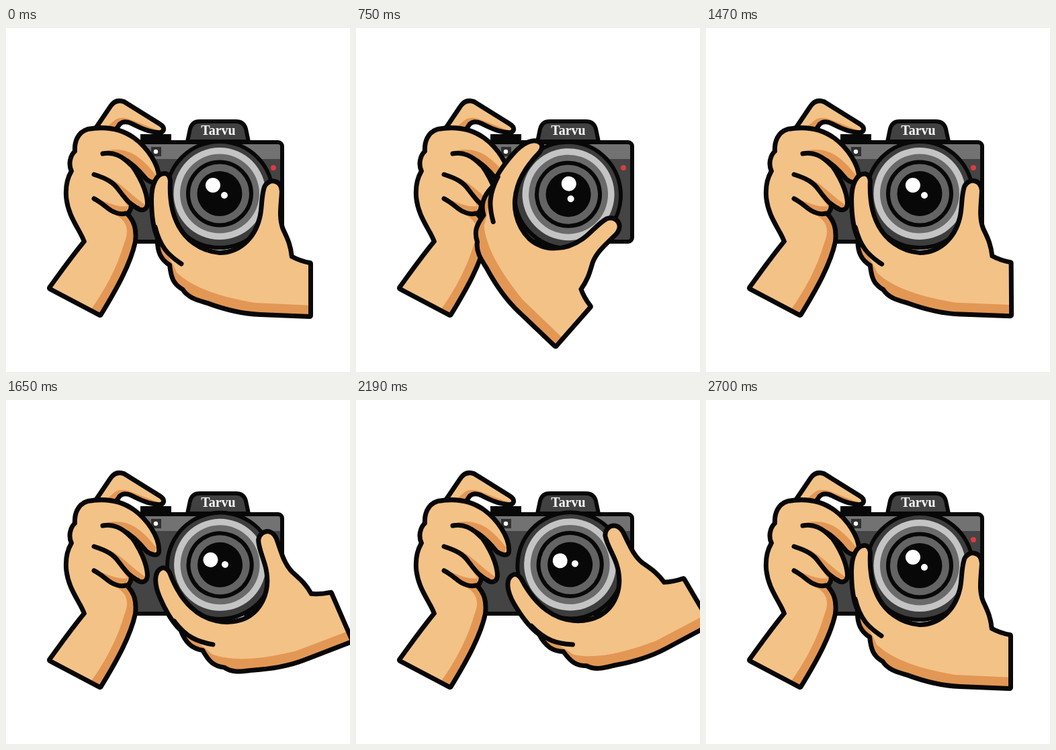
Write an HTML page that moves like this. It is 512 by 512 pixels and loops after 3630 ms.

```html
<!DOCTYPE html>
<html lang="en">
<head>
<meta charset="utf-8">
<title>Camera focus</title>
<style>
  html, body { margin: 0; height: 100%; overflow: hidden; background: #fff; }
  svg { display: block; width: 100%; height: 100%; }
  .line { fill: none; stroke: #080808; stroke-width: 7; stroke-linecap: round; stroke-linejoin: round; }
  .thin { stroke-width: 6; }
  .edge { stroke-width: 10; }
  .rim { stroke-width: 4; }
  .skin { fill: #f3c287; }
  .shade { fill: #e39755; }
  text { font: bold 20px "Liberation Serif", serif; fill: #fff; text-anchor: middle; }
</style>
</head>
<body>
<svg viewBox="0 0 512 512">
  <defs>
    <path id="index" d="M132 154L157 117Q164 107 175 111L228 144C236 149 234 155 226 154C212 153 200 147 188 141Q176 135 168 142L160 154Z"/>
    <path id="left" d="M66 387C80 368 95 346 118 318C112 300 93 280 91 250C90 232 94 222 99 213C94 203 97 190 104 184C103 170 108 156 122 152C150 147 172 152 190 165C208 178 228 205 226 226C225 231 216 229 210 224C202 214 190 200 172 191C190 205 209 240 209 262C208 270 202 271 196 267L185 259C185 268 184 273 178 276C190 288 193 300 191 318C184 350 165 385 140 426Z"/>
    <path id="right" d="M237 218C226 217 218 232 218 255C218 278 221 299 227 312C226 333 232 344 245 352C247 371 250 380 264 388C272 401 287 404 300 408C327 418 351 424 378 425L452 428V351C442 349 433 346 424 341C422 322 417 313 411 300C404 282 408 264 409 243C408 226 391 226 386 237C381 252 383 268 379 283C371 316 346 336 318 336C289 334 264 316 252 288C244 270 242 247 243 227Q242 219 237 218Z"/>
    <clipPath id="index-clip"><use href="#index"/></clipPath>
    <clipPath id="left-clip"><use href="#left"/></clipPath>
    <clipPath id="right-clip"><use href="#right"/></clipPath>
    <clipPath id="body-clip"><rect x="183" y="170" width="228" height="148" rx="6"/></clipPath>
  </defs>

  <g id="camera">
    <g clip-path="url(#body-clip)">
      <path fill="#444" d="M183 170H411V318H183Z"/>
      <path fill="#727272" d="M183 170H411V195H183Z"/>
    </g>
    <rect class="line thin" x="183" y="170" width="228" height="148" rx="6"/>
    <path fill="#080808" d="M200 158H246V172H200Z"/>
    <path class="line thin" style="fill:#414141" d="M270 169L274 150Q277 139 288 139H342Q354 139 357 150L361 169Z"/>
    <text x="316" y="159">Tarvu</text>
    <path fill="#303030" d="M216 177H231V191H216Z"/>
    <circle cx="223" cy="184" r="3.2" fill="#fff"/>
    <circle cx="398" cy="208" r="4" fill="#dc3b40"/>
  </g>

  <g id="left-hand">
    <use href="#index" class="line edge"/>
    <use href="#index" class="skin"/>
    <path class="shade" clip-path="url(#index-clip)" d="M142 154L162 137Q172 130 190 138L236 156L160 170Z"/>
    <use href="#index" class="line rim"/>
    <use href="#left" class="line edge"/>
    <use href="#left" class="skin"/>
    <g class="shade" clip-path="url(#left-clip)">
      <path d="M152 182C185 176 205 196 224 220L218 235L200 220C185 195 165 188 145 190Z"/>
      <path d="M131 218C165 220 180 245 207 263L200 275L180 264C165 240 155 230 131 218Z"/>
      <path d="M131 254C150 257 162 268 182 265L178 278L157 274Z"/>
      <path d="M150 272C180 283 185 298 176 320C165 358 146 392 125 421L140 432L205 330L192 280L176 276Z"/>
    </g>
    <use href="#left" class="line rim"/>
    <path class="line" d="M144 187C160 184 172 190 186 204M131 218C150 224 160 230 167 240C176 252 186 265 196 268M131 254C143 260 150 268 157 272C166 277 174 277 178 276"/>
  </g>

  <g id="lens-hand">
    <g id="lens">
      <circle cx="318" cy="248" r="79" fill="#3d3d3d" stroke="#080808" stroke-width="6"/>
      <circle cx="318" cy="246.5" r="68.5" fill="#c4c4c4"/>
      <circle cx="318" cy="246.5" r="59" fill="#6a6a6a"/>
      <circle cx="318" cy="246.5" r="47" fill="#646464" stroke="#080808" stroke-width="6"/>
      <circle cx="318" cy="246.5" r="33.5" fill="#080808"/>
      <circle cx="308" cy="234" r="11" fill="#fff"/>
      <circle cx="325" cy="249" r="5" fill="#fff"/>
    </g>
    <use href="#right" class="line edge"/>
    <use href="#right" class="skin"/>
    <path class="shade" clip-path="url(#right-clip)" d="M222 300C230 330 245 340 254 364C280 388 320 400 370 409L456 413V440H280L220 350Z"/>
    <use href="#right" class="line rim"/>
    <path class="line" d="M222 296C229 325 241 338 261 351"/>
  </g>
</svg>
<script>
  const LOOP = 3630, STEP = 30, SWING = 45, TURN = 900;
  const hand = document.getElementById("lens-hand");

  // Swing right, sweep across to the left, then return to rest.
  function angleAt(time) {
    const u = (time % TURN) / TURN;
    if (time < TURN) return SWING * (u + 0.8 * u ** 2.5 * (1 - u));
    if (time < 2 * TURN) return SWING * (1 - 2 * u ** 1.5);
    if (time < 3 * TURN) return SWING * (u ** 1.35 - 1);
    return 0;
  }

  function draw() {
    const time = Math.floor((performance.now() % LOOP) / STEP) * STEP;
    hand.setAttribute("transform", `rotate(${angleAt(time)} 315.5 244.5)`);
    requestAnimationFrame(draw);
  }
  draw();
</script>
</body>
</html>
```
